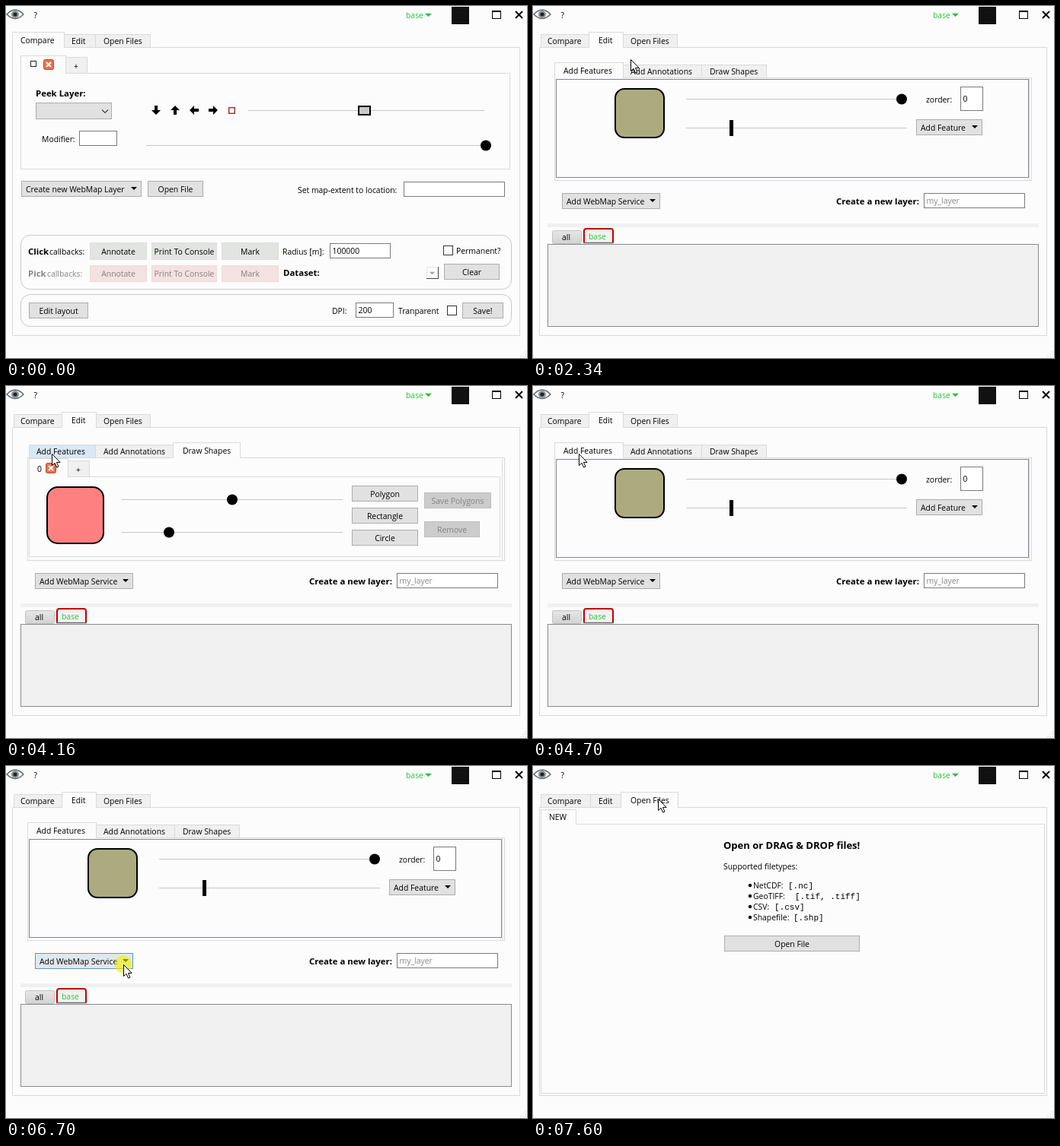
An HTML page that plays this animation: 684 px wide and 463 px high, repeating every 8000 ms.

```html
<!DOCTYPE html>
<html lang="en">
<head>
<meta charset="utf-8">
<title>Map companion window</title>
<style>
  html, body { margin: 0; width: 100%; height: 100%; overflow: hidden; background: #fcfcfc; }
  svg { display: block; }
  text { font: 10.4px "Open Sans", "Noto Sans", sans-serif; white-space: pre; }
  text.b { font-weight: bold; font-size: 11.4px; }
  text.h { font-weight: bold; font-size: 13px; }
  text.m { font: 11px "Liberation Mono", monospace; }
</style>
</head>
<body>
<svg id="stage" width="684" height="463" viewBox="0 0 684 463"></svg>
<script>
const BG = '#fcfcfc', LINE = '#dadada', GREEN = '#2dc23c', LOOP = 8000;

// Basic shapes; boxes are given by their outer pixel edges.
const box = (x1, y1, x2, y2, fill = 'none', stroke = LINE, r = 0, w = 1) =>
  `<rect x="${x1 + w / 2}" y="${y1 + w / 2}" width="${x2 - x1 - w}" height="${y2 - y1 - w}" rx="${r}" fill="${fill}" stroke="${stroke}" stroke-width="${w}"/>`;
const text = (x, y, s, cls = '', fill = '#000', anchor = 'start') =>
  `<text x="${x}" y="${y}" class="${cls}" fill="${fill}" text-anchor="${anchor}">${s}</text>`;
const path = (d, stroke = '#000', w = 1, fill = 'none') =>
  `<path d="${d}" fill="${fill}" stroke="${stroke}" stroke-width="${w}"/>`;
const dot = (x, y, r, fill = '#000') => `<circle cx="${x}" cy="${y}" r="${r}" fill="${fill}"/>`;
const triangle = (x, y, fill = '#000', r = 4) => path(`M${x - r} ${y - r / 2}h${2 * r}l${-r} ${r}z`, 'none', 0, fill);

// Widgets
const STYLES = {
  normal: ['#e1e1e1', '#adadad', '#000'],
  flat: ['#e2e4e2', '#dcdedc', '#000'],
  pink: ['#f4e1e1', '#efdada', '#858080'],
  off: ['#cccccc', '#bfbfbf', '#838383'],
  hover: ['#e3e7eb', '#5f97c4', '#000']
};
const button = (x1, y1, x2, y2, label, style = 'normal') => {
  const [fill, edge, ink] = STYLES[style];
  return box(x1, y1, x2, y2, fill, edge) + text((x1 + x2) / 2, (y1 + y2) / 2 + 4, label, '', ink, 'middle');
};
const menuButton = (x1, y1, x2, y2, label, style = 'normal') => {
  const [fill, edge] = STYLES[style];
  return box(x1, y1, x2, y2, fill, edge) + text(x1 + 6, y1 + 15, label) + triangle(x2 - 10, y1 + 10);
};
const input = (x1, y1, x2, y2, value = '', ink = '#000') =>
  box(x1, y1, x2, y2, '#fff', '#7a7a7a') + text(x1 + 3.5, (y1 + y2) / 2 + 4, value, '', ink);
const checkbox = (x, y) => box(x, y, x + 13, y + 13, '#fff', '#333');
const track = (x1, x2, y) => path(`M${x1} ${y + .5}H${x2}`, '#c6c6c6');
const slider = (x1, x2, y, knob) => track(x1, x2, y) + dot(knob, y + .5, 7);
const closeIcon = (x, y) => box(x, y, x + 14, y + 14, '#e27450', '#c2492b', 2) +
  path(`M${x + 4} ${y + 4}l6 6m0 -6l-6 6`, '#fff', 2);
const arrow = (x, angle) =>
  `<path transform="translate(${x} 137) rotate(${angle})" d="M0 6L-6 0h4v-6h4v6h4z"/>`;

function openTab(x1, x2, top, bottom) {
  return box(x1, top, x2, bottom + 1, BG) + path(`M${x1 + 1} ${bottom + .5}H${x2 - 1}`, BG, 1.6);
}
function tabs(edges, labels, labelX, top, bottom, selected, hovered) {
  const closed = labels.map((s, i) => i === selected ? '' :
    box(edges[i], top + 3, edges[i + 1] + 1, bottom + 1, i === hovered ? '#d8e8f6' : '#f0f0f0')).join('');
  const open = openTab(edges[selected] - 2, edges[selected + 1] + 2, top, bottom);
  return closed + open + labels.map((s, i) =>
    text(labelX[i], top + (i === selected ? 15 : 16), s)).join('');
}

function chrome() {
  const grip = [0, 1, 2].map(i => [0, 1, 2].map(j => i + j < 2 ? '' :
    box(675 + 3 * i, 454 + 3 * j, 677 + 3 * i, 456 + 3 * j, '#b5b5b5', 'none')).join('')).join('');
  return path('M1 11Q12 -1 23 11Q12 22 1 11z', '#666', 1.4, '#f4f4f4') +
    dot(12, 11, 5, '#8a949a') + dot(12, 11, 2.6, '#222') +
    text(36.5, 16, '?') + text(525, 16, 'base', '', GREEN) + triangle(554.5, 12, GREEN, 4.5) +
    box(585, 1, 608, 24, '#111', '#111') +
    box(638, 6, 650, 17, 'none', '#000') + path('M638 7H650', '#000', 2) +
    path('M669 7l9 9m0 -9l-9 9', '#000', 2) + grip;
}

function comparePage() {
  const labels = ['Annotate', 'Print To Console', 'Mark'], left = [110, 191, 283], right = [185, 277, 358];
  const row = (y1, y2, style) => labels.map((s, i) => button(left[i], y1, right[i], y2, s, style)).join('');
  return box(19, 88, 662, 215) + box(78, 67, 107, 89, '#f0f0f0') + text(89, 83, '+') +
    openTab(19, 79, 65, 88) + box(32, 72, 40, 80, '#fff', '#222') + closeIcon(49, 70) +
    text(39, 119, 'Peek Layer:', 'b') + box(39, 127, 139, 149, '#e1e1e1', '#adadad') +
    path('M126 136.5l4 4l4 -4', '#444', 1.2) +
    arrow(197, 0) + arrow(222, 180) + arrow(247, 90) + arrow(272, -90) +
    box(292, 133, 301, 142, '#fff', '#a0282c', 0, 1.4) +
    track(318, 628, 137) + box(462, 131, 479, 144, '#c8c8c8', '#000', 0, 2) +
    text(47, 179, 'Modifier:') + input(96, 164, 146, 184) + slider(184, 630, 183, 630) +
    menuButton(20, 230, 178, 251, 'Create new WebMap Layer') + button(186, 230, 259, 251, 'Open File') +
    text(383, 246, 'Set map-extent to location:') + input(522, 231, 655, 251) +
    box(19, 301, 664, 373, 'none', '#c8c8c8', 12) +
    text(29, 327, 'Click', 'b') + text(57, 327, 'callbacks:') + row(311, 334, 'flat') +
    text(29, 356, 'Pick', 'b', '#858585') + text(54, 356, 'callbacks:', '', '#858585') + row(341, 363, 'pink') +
    text(363, 327, 'Radius [m]:') + input(425, 312, 505, 332, '100000') +
    checkbox(574, 315) + text(591, 326, 'Permanent?') + text(364, 355, 'Dataset:', 'b') +
    path('M552.5 358V343.5H567', '#e6e6e6') + path('M552 358.5H567.5V343', '#444') + triangle(559.5, 351.5, '#a0a0a0', 3.5) +
    button(575, 339, 648, 360, 'Clear') +
    box(19, 379, 664, 422, 'none', '#c8c8c8', 12) + button(30, 390, 108, 411, 'Edit layout') +
    text(428, 405, 'DPI:') + input(459, 390, 509, 410, '200') + text(515, 405, 'Tranparent') +
    checkbox(579, 394) + button(599, 390, 653, 411, 'Save!');
}

function featurePanel() {
  return box(30, 96, 651, 226, 'none', '#85858f') + box(107, 108, 173, 174, '#abab7f', '#000', 12, 2) +
    slider(201, 491, 122, 484) + track(201, 491, 160) + box(258, 150, 263, 171, '#000', '#000') +
    text(516, 127, 'zorder:') + input(561, 106, 591, 138, '0') +
    menuButton(503, 149, 590, 170, 'Add Feature');
}

function annotationPanel() {
  let ticks = '';
  for (let a = 0; a < 8; a++) {
    const c = Math.cos(a * Math.PI / 4), s = Math.sin(a * Math.PI / 4);
    ticks += path(`M${102 + 17 * c} ${139.5 + 17 * s}L${102 + 22 * c} ${139.5 + 22 * s}`, '#555');
  }
  return box(40, 123, 73, 156, '#fff', '#222', 6, 1.5) + ticks +
    '<circle cx="102" cy="139.5" r="17" fill="url(#dial)" stroke="#999"/>' +
    '<circle cx="110" cy="132" r="3" fill="#eee" stroke="#888"/>' +
    text(131, 138, 'Add Annotation') + text(131, 151, 'on next click:') +
    box(212, 105, 578, 175, BG, '#7a7a7a') +
    button(585, 114, 641, 131, 'Annotate') + button(585, 147, 641, 164, 'Remove');
}

function shapePanel() {
  return box(30, 119, 649, 225) + box(81, 98, 110, 120, '#f0f0f0') + text(92, 114, '+') +
    openTab(30, 82, 95, 119) + text(41, 113, '0') + closeIcon(52, 101) +
    box(53, 132, 129, 208, '#ff8080', '#000', 14, 2) +
    slider(152, 442, 149, 297) + slider(152, 442, 192, 214) +
    ['Polygon', 'Rectangle', 'Circle'].map((s, i) => button(454, 131 + 29 * i, 541, 152 + 29 * i, s)).join('') +
    button(549, 140, 637, 161, 'Save Polygons', 'off') + button(549, 178, 622, 199, 'Remove', 'off');
}

function editPage({ panel, hover }) {
  const hovered = ['features', 'annotations', 'shapes'].indexOf(hover);
  return box(28, 94, 652, 230) + box(28, 94, 655, 230) +
    tabs([30, 117, 221, 306], ['Add Features', 'Add Annotations', 'Draw Shapes'], [40, 128, 232], 74, 94, panel, hovered) +
    [featurePanel, annotationPanel, shapePanel][panel]() +
    menuButton(38, 246, 167, 267, 'Add WebMap Service', hover === 'webmap' ? 'hover' : 'normal') +
    text(398, 261, 'Create a new layer:', 'b') + input(513, 246, 646, 266, 'my_layer', '#858585') +
    box(19, 286, 664, 291, '#f0f0f0', '#f0f0f0') +
    box(25, 295, 64, 313, 'url(#tab)', '#c4c4c4', 2) + text(38, 308, 'all') +
    box(19, 313, 664, 422, '#f0f0f0', '#8a8a8a') +
    path('M67 311V296q0 -3 3 -3h32q3 0 3 3V311', '#c00000', 2, '#f2f2f2') +
    path('M66 311.5H106', '#666', 1.5) + text(73, 307, 'base', '', GREEN);
}

function filesPage() {
  const types = [['NetCDF:', '[.nc]', 335], ['GeoTIFF:', '[.tif, .tiff]', 344], ['CSV:', '[.csv]', 317], ['Shapefile:', '[.shp]', 342]];
  return box(10, 76, 672, 431) + openTab(10, 57, 57, 76) + text(21, 71, 'NEW') +
    text(250, 109, 'Open or DRAG &amp; DROP files!', 'h') + text(250, 136, 'Supported filetypes:') +
    types.map(([name, ext, x], i) => dot(285, 157 + 14 * i, 2.2) +
      text(289, 161 + 14 * i, name) + text(x, 161 + 14 * i, ext, 'm')).join('') +
    button(251, 223, 429, 244, 'Open File');
}

function serviceMenu() {
  const items = ['OpenStreetMap', 'Land Cover', 'Satellite Mosaic', 'Relief Shading', 'Ocean Depth',
    'Air Quality', 'Terrain Tiles', 'ORVEN SoilTiles', 'TLN Basemaps'];
  return box(37, 267, 199, 480, '#f2f2f2', '#c8c8c8') + items.map((s, i) =>
    text(71, 294 + 21 * i, s) + path(`M176 ${287 + 21 * i}l4 3.5l-4 3.5z`, 'none', 0, '#222')).join('');
}

function pointer(x, y, click) {
  return (click ? `<circle cx="${x}" cy="${y}" r="11.5" fill="#f2f000" opacity=".6"/>` : '') +
    path(`M${x + .5} ${y + .5}v15l3.5 -3.2l2.6 5.7l2.4 -1l-2.6 -5.6h4.7z`, '#000', 1, '#fff');
}

// Each step: start time, pointer position, then the settings that change there.
const STEPS = [
  [0, -40, -40, { page: 0, panel: 0 }],
  [540, 195, 250], [720, 166, 146], [900, 125, 84], [1080, 101, 52, { hover: 'edit' }], [1260, 97, 44],
  [1620, 97, 44, { page: 1, hover: '' }],
  [2340, 128, 70], [2520, 162, 84, { hover: 'annotations' }],
  [2700, 164, 84, { panel: 1, hover: '' }], [2900, 215, 87], [3080, 258, 88, { hover: 'shapes' }],
  [3440, 258, 88, { panel: 2, hover: '', click: true }], [3620, 258, 88, { click: false }],
  [3980, 150, 88, { hover: 'annotations' }], [4160, 60, 89, { hover: 'features' }],
  [4520, 60, 89, { panel: 0, hover: '', click: true }], [4700, 60, 89, { click: false }],
  [5060, 88, 127], [5240, 151, 214], [5420, 153, 250, { hover: 'webmap' }], [5600, 154, 261],
  [5780, 154, 261, { menu: true, click: true }], [5960, 154, 261, { click: false }],
  [6700, 154, 261, { menu: false, click: true }], [6880, 154, 240, { click: false, hover: '' }],
  [7060, 156, 165], [7240, 161, 85], [7420, 164, 43, { hover: 'files' }],
  [7600, 164, 43, { page: 2, hover: '' }]
];
let settings = {};
const states = STEPS.map(([start, x, y, change]) => {
  settings = { ...settings, ...change };
  return { start, x, y, ...settings };
});

const DEFS = `<defs>
  <linearGradient id="dial" x2="1" y2="1"><stop stop-color="#fff"/><stop offset="1" stop-color="#cfcfcf"/></linearGradient>
  <linearGradient id="tab" x2="0" y2="1"><stop stop-color="#e6e6e6"/><stop offset="1" stop-color="#d3d3d3"/></linearGradient>
</defs>`;

function draw(state) {
  const hovered = ['compare', 'edit', 'files'].indexOf(state.hover);
  return DEFS + box(0, 0, 684, 463, BG, BG) + chrome() + box(8, 54, 675, 434) +
    tabs([10, 75, 117, 189], ['Compare', 'Edit', 'Open Files'], [19, 86, 128], 34, 54, state.page, hovered) +
    [comparePage, editPage, filesPage][state.page](state) +
    (state.menu ? serviceMenu() : '') + pointer(state.x, state.y, state.click);
}

const stage = document.getElementById('stage');
let shown;
function update(now) {
  const t = now % LOOP;
  const state = states.findLast(s => s.start <= t) || states[0];
  if (state !== shown) stage.innerHTML = draw(shown = state);
}
const origin = performance.now();
function tick() {
  update(performance.now() - origin);
  requestAnimationFrame(tick);
}
tick();
</script>
</body>
</html>
```
